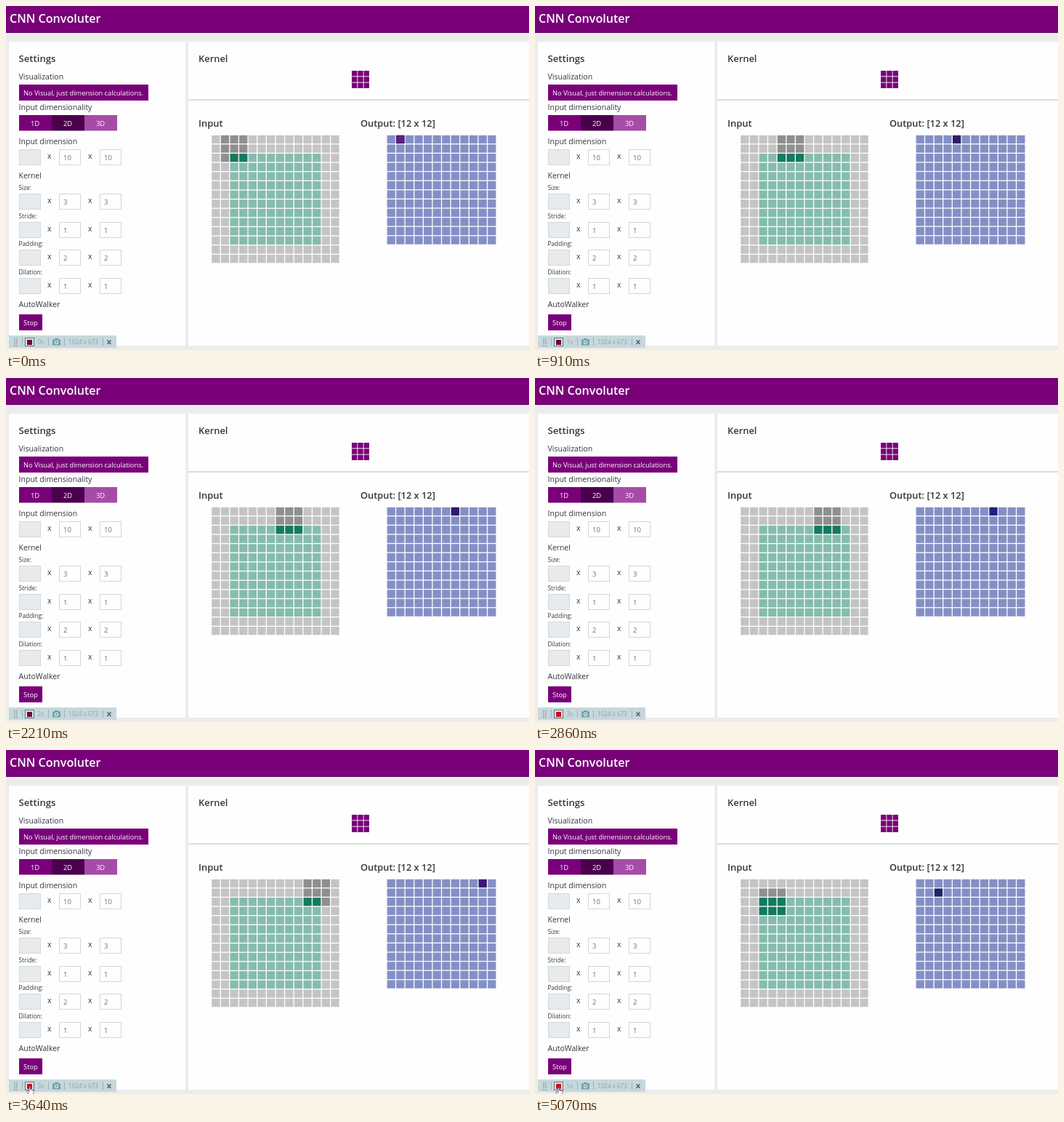
An HTML page with a canvas for the animation above (5200 ms loop, 720 px wide and 473 px high).

```html
<!DOCTYPE html>
<html lang="en">
<head>
<meta charset="utf-8">
<title>CNN Convoluter</title>
<style>
html, body { margin: 0; width: 100%; height: 100%; overflow: hidden; background: #ececec; }
canvas { display: block; width: 720px; height: 473px; }
</style>
</head>
<body>
<canvas id="stage" width="720" height="473"></canvas>
<script>
const ctx = document.getElementById('stage').getContext('2d');
const LOOP = 5200;
const PURPLE = '#790079';
const INK = '#33373b';

// Moments at which the kernel moves on, the clock ticks, and the pointer moves
const STEPS = [130, 520, 910, 1430, 1820, 2210, 2600, 2990, 3510, 3900, 4290, 4680, 5070];
const TICKS = [910, 1820, 2860, 3900, 4940];
const POINTER = [[3120, 45, 471], [3250, 42, 468], [3380, 37, 465], [3510, 35, 465], [3640, 33, 463], [4940, 33, 464]];
// Active output cell, one colour per step
const ACTIVE = ['#681c88', '#352b66', '#34205f', '#321c5e', '#31195f', '#30195f', '#2d1a6c',
  '#271a87', '#471b86', '#3a1a75', '#301a62', '#2c1a60', '#281f64', '#1e2468'];

const passed = (times, t) => times.filter(s => t >= s).length;

function rect(x, y, w, h, fill, stroke) {
  ctx.fillStyle = fill;
  ctx.fillRect(x, y, w, h);
  if (stroke) {
    ctx.strokeStyle = stroke;
    ctx.lineWidth = 1;
    ctx.strokeRect(x + 0.5, y + 0.5, w - 1, h - 1);
  }
}

function text(str, x, y, size, color = INK, weight = 400) {
  ctx.font = `${weight} ${size}px "Open Sans", "Noto Sans", sans-serif`;
  ctx.fillStyle = color;
  ctx.fillText(str, x, y);
}

function grid(x, y, n, pitch, size, colorAt) {
  for (let r = 0; r < n; r++)
    for (let c = 0; c < n; c++)
      rect(x + c * pitch, y + r * pitch, size, size, colorAt(r, c));
}

function fieldRow(y, value) {
  rect(18, y, 30, 22, '#e8ebed', '#d3d8db');
  for (const x of [73, 129]) {
    text('x', x - 16, y + 13, 10.5);
    rect(x, y, 30, 22, '#fefefe', '#d3d6d9');
    text(value, x + 6, y + 15, 9.5, '#6a7075');
  }
}

function settings() {
  text('Settings', 17.5, 77, 13.2, INK, 600);
  text('Visualization', 17.5, 101, 10.55);
  rect(18, 108, 178, 22, PURPLE);
  text('No Visual, just dimension calculations.', 24, 123, 9.3, '#fff');
  text('Input dimensionality', 17.5, 143, 10.55);
  ['#790079', '#4a004c', '#a64ca8'].forEach((color, i) => {
    rect(18 + 45 * i, 150, 45, 21.5, color);
    text(`${i + 1}D`, 34 + 45 * i, 164.5, 9.4, '#fff');
  });
  text('Input dimension', 17.5, 190, 10.55);
  fieldRow(197, '10');
  text('Kernel', 17.5, 237, 10.4);
  [['Size:', '3'], ['Stride:', '1'], ['Padding:', '2'], ['Dilation:', '1']].forEach(([label, value], i) => {
    const y = 258 + Math.round(38.7 * i);
    text(label, 17.5, y - 5, 8.3);
    fieldRow(y, value);
  });
  text('AutoWalker', 17.5, 414, 10.6);
  rect(18, 424, 32, 22, PURPLE);
  text('Stop', 24, 438.5, 9.4, '#fff');
}

function recorder(t) {
  const teal = '#71a5a8', slate = '#53777f';
  rect(4, 453, 148, 17, '#c7d7dc');
  for (let r = 0; r < 4; r++)
    for (let c = 0; c < 2; c++) rect(11 + c * 3, 457 + r * 3, 1.6, 1.6, teal);
  for (const x of [22, 58, 80, 133]) rect(x, 456, 1, 11, '#9cb3b9');

  rect(26, 456, 13, 12, '#dce7e9', slate);
  rect(29, 459, 7, 7, t < 2860 ? '#7b0535' : '#d8051c');
  text(`${passed(TICKS, t)}s`, 43.5, 465, 8.3, '#93a9b1');

  rect(64, 458.5, 11, 8, teal);
  rect(67, 457, 5, 2, teal);
  ctx.beginPath();
  ctx.arc(69.5, 462.5, 2.7, 0, 7);
  ctx.fillStyle = '#d5e3e6';
  ctx.fill();
  ctx.beginPath();
  ctx.arc(69.5, 462.5, 1.4, 0, 7);
  ctx.fillStyle = teal;
  ctx.fill();

  text('1024 x 673', 86, 465, 8.1, '#8fa5ad');
  ctx.strokeStyle = '#486b75';
  ctx.lineWidth = 1.6;
  ctx.beginPath();
  ctx.moveTo(139.5, 459.5); ctx.lineTo(144.5, 465);
  ctx.moveTo(144.5, 459.5); ctx.lineTo(139.5, 465);
  ctx.stroke();
}

function shape(points) {
  ctx.beginPath();
  points.forEach(([x, y]) => ctx.lineTo(x, y));
  ctx.closePath();
  ctx.fillStyle = '#fff';
  ctx.strokeStyle = '#555';
  ctx.lineWidth = 0.8;
  ctx.fill();
  ctx.stroke();
}

function pointer(t) {
  const n = passed(POINTER.map(p => p[0]), t);
  if (!n) return;
  const [, x, y] = POINTER[n - 1];
  ctx.save();
  ctx.translate(x, y);
  if (t < 3510) {
    shape([[0, 0], [0, 9], [2, 7], [4, 10], [5, 9.5], [4, 6.5], [7, 6.5]]);
  } else {
    shape([[-1, 0], [0.5, 0], [0.5, 4], [5, 5], [5, 8], [3.5, 11], [-1.5, 11], [-4.5, 6.5], [-3.5, 5.5], [-1, 7.5]]);
  }
  ctx.restore();
}

function draw(t) {
  const step = passed(STEPS, t);
  const row = Math.floor((step + 1) / 12), col = (step + 1) % 12;
  const covered = (r, c) => r >= row && r < row + 3 && c >= col && c < col + 3;
  const padded = (r, c) => Math.min(r, c) < 2 || Math.max(r, c) > 11;

  rect(0, 0, 720, 473, '#ececed');
  rect(0, 0, 720, 37, PURPLE);
  rect(0, 36, 720, 1, '#690069');
  text('CNN Convoluter', 5, 22.5, 16.1, '#fff', 600);
  rect(4, 49, 243, 418, '#fefefe');
  rect(251, 49, 469, 418, '#fefefe');
  rect(251, 128, 469, 2, '#dcdcdd');

  settings();

  text('Kernel', 265, 77, 12.9, INK, 600);
  grid(476, 89, 3, 8.3, 7.4, () => PURPLE);

  text('Input', 265, 166, 13, INK, 600);
  grid(283.2, 177.8, 14, 12.63, 11.3, (r, c) =>
    covered(r, c) ? (padded(r, c) ? '#8f8f8f' : '#127a60')
                  : (padded(r, c) ? '#c5c4c5' : '#85bcad'));

  text('Output: [12 x 12]', 488, 166, 12.85, INK, 600);
  grid(524.6, 177.8, 12, 12.6, 11.3, (r, c) =>
    r === row && c === col ? ACTIVE[step] : '#8490c5');
  if (step === 0) {
    ctx.strokeStyle = '#30205c';
    ctx.lineWidth = 1;
    ctx.strokeRect(524.6 + col * 12.6 + 0.5, 178.3, 10.3, 10.3);
  }

  recorder(t);
  pointer(t);
}

let start;
function frame(now) {
  start ??= now;
  draw((now - start) % LOOP);
  requestAnimationFrame(frame);
}
draw(0);
requestAnimationFrame(frame);
</script>
</body>
</html>
```
